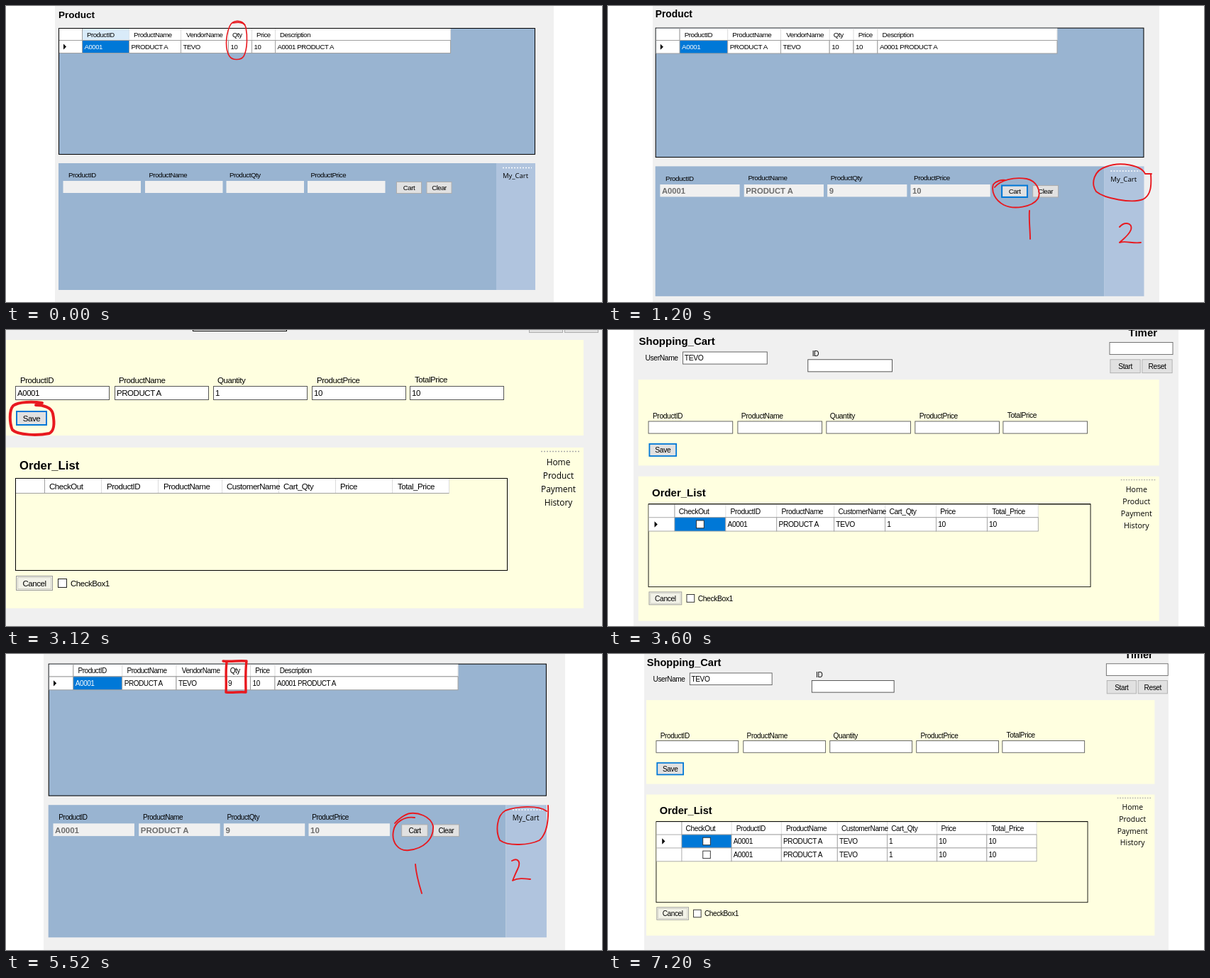
Write an HTML page that moves like this. It is 840 px wide and 418 px high and loops after 8000 ms.

```html
<!DOCTYPE html>
<html lang="en">
<head>
<meta charset="utf-8">
<title>Shopping cart walkthrough</title>
<style>
  html, body { margin: 0; width: 100%; height: 100%; overflow: hidden; background: #fff; }
  #stage { display: block; width: 840px; height: 418px; }
  text { font-family: "Liberation Sans", Arial, sans-serif; fill: #000; white-space: pre; }
  .store text { font-size: 9.6px; letter-spacing: -.45px; }
  .cart text { font-size: 11.5px; letter-spacing: -.45px; }
  .cart .title { font: bold 16.67px "Liberation Sans", Arial, sans-serif; letter-spacing: 0; }
  .store .title { font: bold 13.5px "Liberation Sans", Arial, sans-serif; letter-spacing: 0; }
  .store .locked { font: bold 11px "Liberation Sans", Arial, sans-serif; letter-spacing: 0; fill: #6d6d6d; }
  .store .menu { font: 9.5px "Open Sans", "Noto Sans", sans-serif; letter-spacing: 0; }
  .cart .menu { font: 11.9px "Open Sans", "Noto Sans", sans-serif; letter-spacing: 0; }
  .mid { text-anchor: middle; }
  .pen { fill: none; stroke: #e8191f; stroke-linecap: round; stroke-linejoin: round; }
</style>
</head>
<body>
<svg id="stage" viewBox="0 0 840 418"></svg>
<script>
const BLUE = '#0078d7', GRID = '#a0a0a0', OWNER = 'TEVO';

const box = (x, y, w, h, fill, stroke = 'none', width = 1) =>
  `<rect x="${x}" y="${y}" width="${w}" height="${h}" fill="${fill}" stroke="${stroke}" stroke-width="${width}"/>`;
const text = (x, y, s, cls = '', fill = '') =>
  `<text x="${x}" y="${y}" class="${cls}"${fill && ` style="fill:${fill}"`}>${s}</text>`;
const line = (x1, y1, x2, y2, color, extra = '') =>
  `<line x1="${x1}" y1="${y1}" x2="${x2}" y2="${y2}" stroke="${color}" ${extra}/>`;
const button = (x, y, w, h, s, focus) =>
  box(x, y, w, h, '#e1e1e1', focus ? BLUE : '#adadad', focus ? 2 : 1) +
  text(x + w / 2, y + h * .72, s, 'mid');
const pen = (width, ...paths) => `<path class="pen" stroke-width="${width}" d="${paths.join('')}"/>`;
const arrow = (x, y, r) => `<path d="M${x} ${y - r}l${r} ${r}l${-r} ${r}z"/>`;
const check = (x, y, size) => box(x, y, size, size, '#fff', '#222');

// Header and rows of a data grid; cols holds the column edges.
function table(cols, top, head, rowH, titles, titleX, rows, selected) {
  const left = cols[0], right = cols.at(-1), bottom = top + head;
  let out = box(left, top, right - left, head + rows.length * rowH, '#fff');
  cols.slice(1).forEach(x => out += line(x, top, x, bottom, '#dcdcdc'));
  titles.forEach((s, i) => out += text(titleX[i], top + head * .72, s));
  out += line(left, bottom, right, bottom, GRID) + line(cols[1], top, cols[1], bottom, GRID);
  rows.forEach((cells, r) => {
    const y = bottom + r * rowH;
    cells.forEach((s, i) => {
      const on = r === 0 && i === selected, x = cols[i + 1], w = cols[i + 2] - x;
      out += box(x, y, w, rowH, on ? BLUE : '#fff', GRID);
      out += s === null ? check(x + w / 2 - 6, y + rowH / 2 - 6, 12)
                        : text(x + 3, y + rowH * .7, s, '', on ? '#fff' : '');
    });
    out += line(left, y + rowH, cols[1], y + rowH, GRID);
  });
  return out + (rows.length ? arrow(left + 6 + (rowH > 20 ? 3 : 0), bottom + rowH / 2, rowH * .22) : '');
}

function store({ qty, values = [], focus, lit }) {
  const cols = [75, 107.5, 173.5, 246.5, 313.5, 346.5, 379.5, 626.5];
  const fieldX = [80.5, 196, 310.5, 425];
  return text(74, 17, 'Product', 'title') +
    box(74.5, 31.5, 671, 178, '#99b4d1', '#000') +
    table(cols, 32, 16.5, 18,
      ['ProductID', 'ProductName', 'VendorName', 'Qty', 'Price', 'Description'],
      [114, 180, 254, 319, 353, 386],
      [['A0001', 'PRODUCT A', OWNER, qty, '10', 'A0001 PRODUCT A']], 0) +
    (lit ? box(108, 32, 65.5, 16, '#d9ebf9') + text(114, 43.9, 'ProductID') : '') +
    box(74, 222, 617, 179, '#99b4d1') + box(691, 222, 55, 179, '#b0c4de') +
    ['ProductID', 'ProductName', 'ProductQty', 'ProductPrice'].map((s, i) =>
      text([88, 201.5, 315, 429.5][i], i ? 241.5 : 242, s) +
      box(fieldX[i], 247, 109.5, 17, '#f0f0f0') +
      text(fieldX[i] + 2.5, 259.8, values[i] ?? '', 'locked')).join('') +
    button(550.5, 248.5, 35, 16, 'Cart', focus) + button(593, 248.5, 35, 16, 'Clear') +
    line(700, 228.5, 741, 228.5, '#fff', 'stroke-width="1.5" stroke-dasharray="2 2"') +
    text(718, 243, 'My_Cart', 'menu mid');
}

function cart({ values = [], rows = 0, selected, idBorder = '#444' }) {
  const cols = [14, 54.5, 134.5, 214.5, 304.5, 384.5, 464.5, 544.5, 624.5];
  const fieldX = [13.5, 153.5, 292.5, 431.5, 569.5];
  const row = [null, 'A0001', 'PRODUCT A', OWNER, '1', '10', '10'];
  return text(-1.5, -41, 'Shopping_Cart', 'title') +
    text(8.5, -16, 'UserName') + box(67.5, -29.5, 132, 19, '#fff', '#555') + text(70, -16, OWNER) +
    text(270, -22.5, 'ID') + box(263.5, -17.5, 132, 19, '#fff', idBorder) +
    text(766, -53.5, 'Timer', 'title') + box(736.5, -44.5, 99, 19, '#fff', '#666') +
    button(737.5, -17.5, 47, 21, 'Start') + button(787.5, -17.5, 47, 21, 'Reset') +
    box(-2.4, 14, 816.4, 135, '#ffffe0') + box(-2.4, 166, 816.4, 227, '#ffffe0') +
    ['ProductID', 'ProductName', 'Quantity', 'ProductPrice', 'TotalPrice'].map((s, i) =>
      text([20, 159, 298, 438, 576][i], i < 4 ? 75 : 74, s) +
      box(fieldX[i], 79.5, 132, 19, '#fff', '#555') +
      text(fieldX[i] + 2.5, 93, values[i] ?? '')).join('') +
    button(15, 115, 42, 19, 'Save', true) +
    text(19, 197, 'Order_List', 'title') +
    box(13.5, 209.5, 693, 130, 'none', '#000') +
    table(cols, 210, 20.5, 21.5,
      ['CheckOut', 'ProductID', 'ProductName', 'CustomerName', 'Cart_Qty', 'Price', 'Total_Price'],
      [61, 142, 222, 311, 391, 471, 552], Array(rows).fill(row), selected) +
    line(13.5, 209.5, 706.5, 209.5, '#000') +
    box(14.5, 347.5, 51, 20, '#f2f2e8', '#999') + box(16.5, 349.5, 47, 16, 'none', '#d0d0c4') +
    text(40, 362, 'Cancel', 'mid') +
    check(73.5, 351.5, 12) + text(91, 362, 'CheckBox1') +
    line(754, 171.5, 808, 171.5, '#aaa', 'stroke-width="1.5" stroke-dasharray="2 2"') +
    ['Home', 'Product', 'Payment', 'History'].map((s, i) => text(778.5, 191 + 19 * i, s, 'menu mid')).join('');
}

// Clips to the window from left to right; (x, y) is where the main grid sits.
function scene(kind, left, right, x, y, scale, content, marks = '') {
  const [bx, by] = kind === 'store' ? [74, 31] : [13, 209], w = right - left;
  return `<svg x="${left}" width="${w}" height="418" viewBox="${left} 0 ${w} 418" visibility="hidden">` +
    box(left, 0, w, 418, '#f0f0f0') +
    `<g class="${kind}" transform="translate(${x} ${y}) scale(${scale}) translate(${-bx} ${-by})">${content}</g>` +
    marks + '</svg>';
}

const picked = ['A0001', 'PRODUCT A', '9', '10'];
const ordered = ['A0001', 'PRODUCT A', '1', '10', '10'];

const stage = document.getElementById('stage');
stage.innerHTML = [
  scene('store', 69, 772, 74, 31, 1, store({ qty: '10', lit: true }),
    pen(1.6, 'M337 27C332 19 319 19 315 29C309 44 309 62 315 71C319 77 331 77 335 71C341 60 340 40 338 30C336 23 329 22 320 24')),
  scene('store', 63, 777, 66.7, 30.6, 1.025, store({ qty: '10', values: picked, focus: true }),
    pen(1.9, 'M545 256C553 246 572 241 590 244C604 247 611 261 606 272C598 284 572 288 558 281C545 274 540 262 543 252C547 247 555 245 560 246',
      'M594 289C593 302 595 315 595 329',
      'M766 237H757C752 225 722 219 702 227C685 232 680 250 688 262C700 272 738 279 754 273C766 267 766 252 765 237',
      'M721 312C728 304 740 306 737 316C734 324 724 331 721 334C730 331 740 336 751 334')),
  scene('cart', 0, 840, 13, 209, 1, cart({ values: ordered, idBorder: '#000' }),
    pen(4, 'M51 103C38 101 18 101 10 107C4 114 5 132 9 141C17 149 46 149 61 146C69 142 68 128 66 118C64 109 52 106 42 106')),
  scene('cart', 36, 804, 56.6, 245.4, .899, cart({ rows: 1, selected: 0 })),
  scene('store', 53, 788, 59.7, 13.6, 1.045, store({ qty: '9', values: picked }),
    pen(3.4, 'M306 10C318 11 329 9 339 10C337 25 338 40 338 54C328 53 320 55 310 54C311 40 309 25 311 12') +
    pen(1.9, 'M576 231C562 229 548 237 546 250C543 266 553 279 568 277C588 275 603 262 602 243C598 228 580 224 570 225C562 226 552 234 548 239',
      'M577 297C578 312 582 325 586 338',
      'M762 222C750 213 720 215 704 221C691 228 690 251 696 263C708 272 738 270 752 263C762 254 765 235 764 214',
      'M713 292C722 287 726 294 721 304C717 312 715 318 714 320C722 316 730 317 739 318')),
  scene('cart', 29, 811, 45.6, 250.5, .9236, cart({ values: ordered, rows: 1, selected: 1, idBorder: '#000' }),
    pen(4, 'M29 172C32 160 46 154 64 155C82 156 95 163 96 177C96 190 80 197 60 196C44 195 33 190 29 182')),
  scene('cart', 51, 790, 67.5, 236.2, .8775, cart({ rows: 2, selected: 0 }))
].join('');

const scenes = [...stage.children];
function play(now) {
  const current = Math.floor(now % 8000 / 1200);
  scenes.forEach((s, i) => s.setAttribute('visibility', i === current ? 'visible' : 'hidden'));
  requestAnimationFrame(play);
}
play(performance.now());
</script>
</body>
</html>
```
